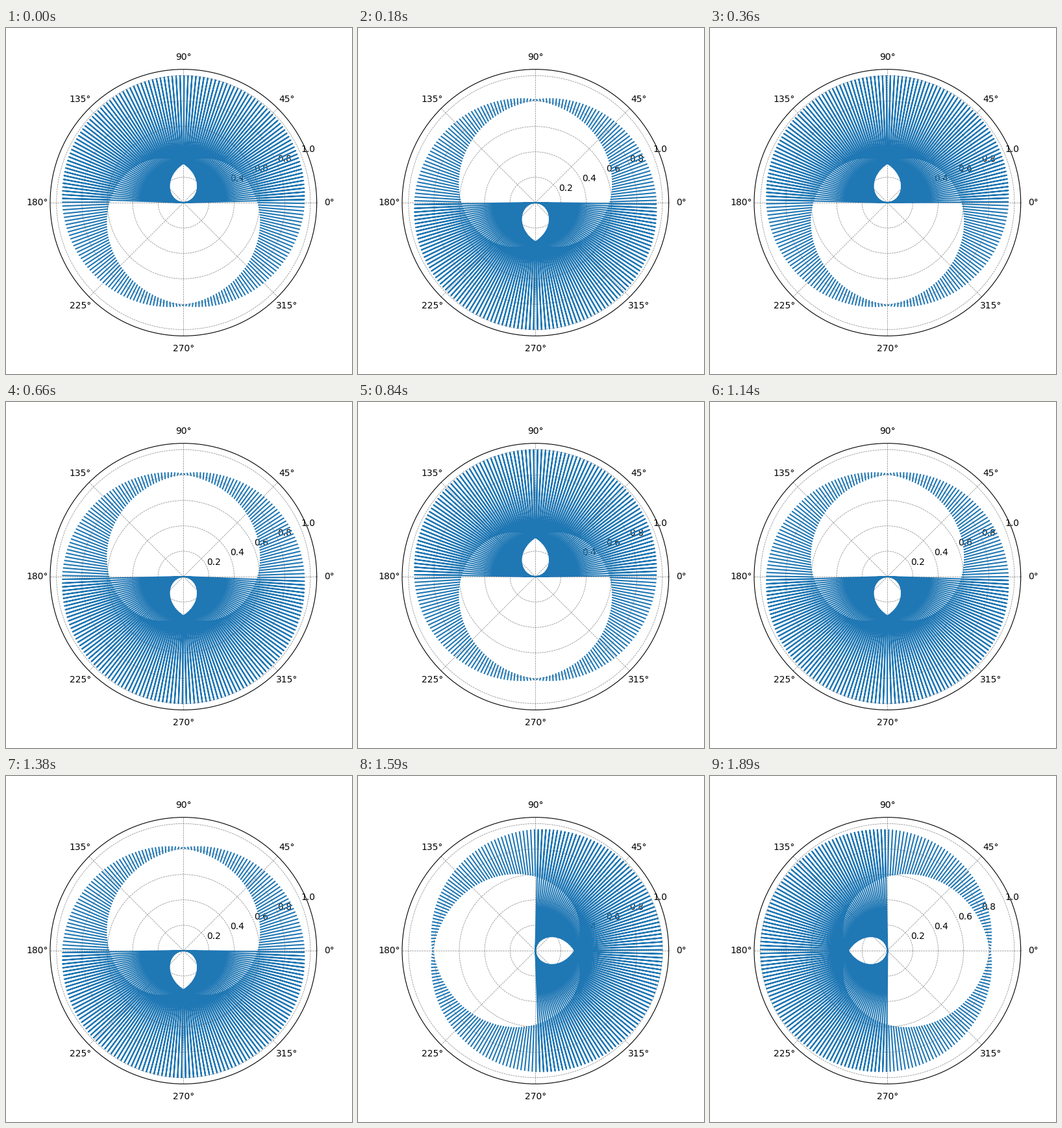
Recreate the animation shown at these times as a matplotlib script. Size 533 by 533 pixels, loop 1920 ms.

```python
import numpy as np
import matplotlib.pyplot as plt
from matplotlib.animation import FuncAnimation

FRAMES = 64
INTERVAL = 30      # ms
WAVES = 200        # wave crests around the circle
PERIOD = 20        # steps per full wave cycle
START = 8          # step of the cycle at which the loop begins

theta = np.linspace(0, 2 * np.pi, 1000)


def wave(step):
    """Travelling sine; its negative half is not drawn."""
    phase = 2 * np.pi * (step % PERIOD) / PERIOD
    r = np.sin(WAVES * theta + phase)
    return np.where(r >= 0, r, np.nan)


fig = plt.figure(figsize=(16 / 3, 16 / 3), dpi=100)
ax = fig.add_subplot(projection="polar")
line, = ax.plot(theta, wave(START), color="tab:blue", lw=1.5)
ax.set_ylim(0, 1.05)
ax.set_yticks([0.2, 0.4, 0.6, 0.8, 1.0])
ax.grid(color="gray", linestyle="--", linewidth=0.5)


def update(i):
    line.set_ydata(wave(START + i))
    return line,


anim = FuncAnimation(fig, update, frames=FRAMES, interval=INTERVAL,
                     repeat=True, repeat_delay=0)
plt.show()
```
